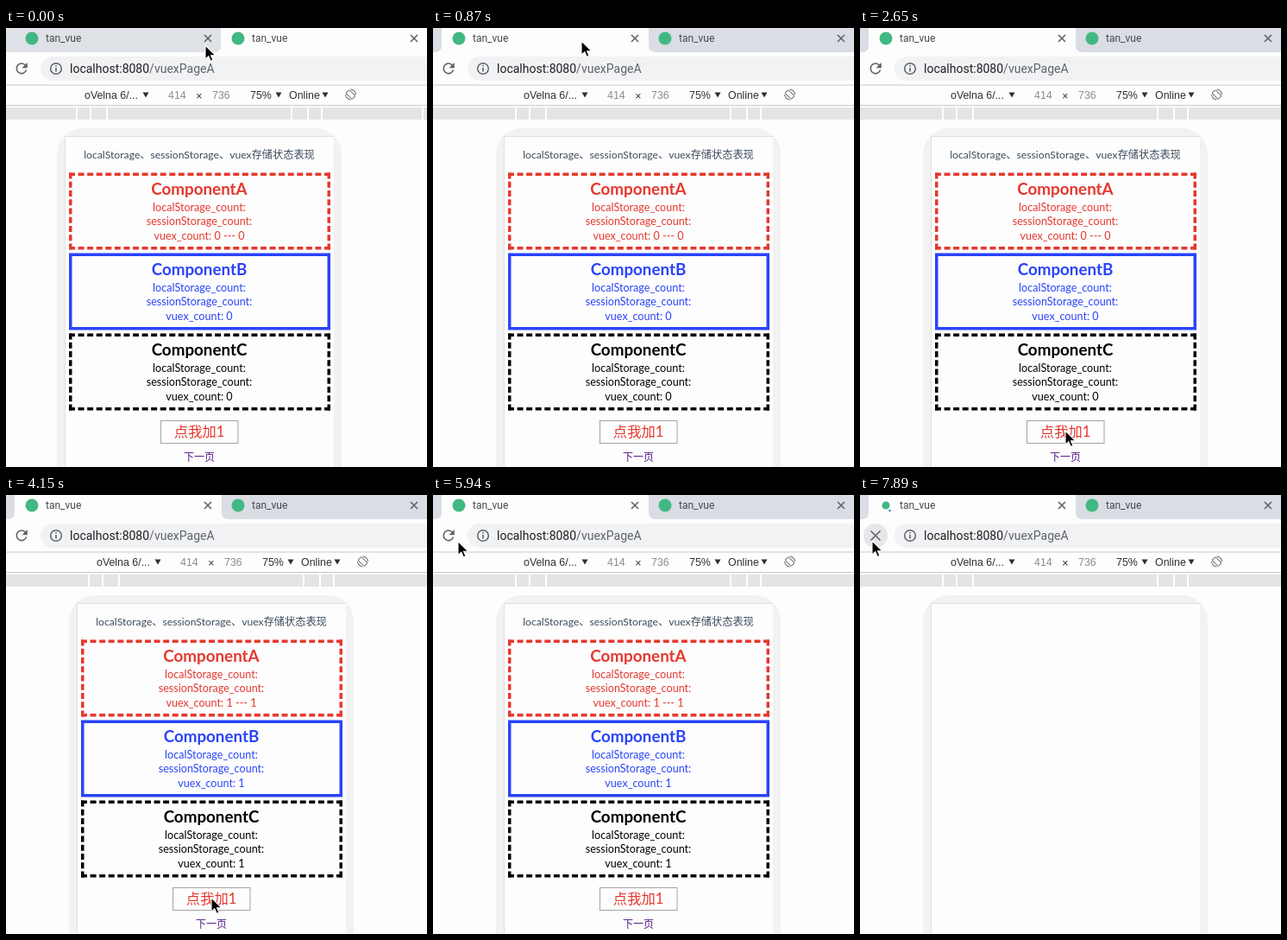
Animation, 488 px wide and 508 px high, one loop 8 s. Source, as an HTML page:

```html
<!DOCTYPE html>
<html lang="zh">
<head>
<meta charset="utf-8">
<style>
  html, body { margin: 0; width: 100%; height: 100%; overflow: hidden; background: #fdfdfd; }
  svg { display: block; width: 488px; height: 508px; }
  text { white-space: pre; }
  .ui { font: 12px Roboto, sans-serif; fill: #45494d; }
  .url { font: 14px Roboto, sans-serif; fill: #202124; }
  .tool { font: 12.4px "Liberation Sans", Arial, sans-serif; fill: #303030; }
  .page { font-family: Lato, "Noto Sans CJK SC", "Noto Sans CJK", sans-serif; text-anchor: middle; }
  .line { fill: none; stroke: #5f6368; stroke-width: 1.6; }
</style>
</head>
<body>
<svg viewBox="0 0 488 508">
  <rect width="488" height="508" fill="#fdfdfd"/>
  <rect width="488" height="30" fill="#dadde3"/>
  <rect id="hover" width="249" height="28" fill="#dee1e6"/>
  <path id="tab" fill="#fdfdfd"/>
  <rect y="28" width="488" height="37" fill="#fdfdfd"/>
  <g id="tabs"></g>
  <g id="spinner" fill="none" stroke-width="2">
    <circle cx="30" cy="12" r="6.6" stroke-dasharray="34 7.5"/>
  </g>
  <circle id="dot" cx="34.5" cy="18" r="1.3" fill="#3f82e8"/>

  <rect x="40" y="33" width="480" height="28" rx="14" fill="#f1f2f4"/>
  <g class="line">
    <circle cx="58" cy="47" r="6.3" stroke-width="1.5"/>
    <path d="M58 46v4.5M58 43v1.6"/>
  </g>
  <text class="url" x="74" y="52">localhost:8080<tspan fill="#5f6368">/vuexPageA</tspan></text>
  <circle id="press" cx="18" cy="47" r="14" fill="#e6e7e9"/>
  <g id="reload">
    <path class="line" stroke-width="1.9" d="M22.6 43.2A5.8 5.8 0 1 0 23.6 48.6"/>
    <path fill="#5f6368" d="M24.8 40v6.2h-6.2z"/>
  </g>
  <path id="stop" class="line" stroke-width="1.9" d="M12.5 41.5l11 11m0-11l-11 11"/>

  <path d="M0 66H488M0 89.5H488" stroke="#c9c9c9"/>
  <g id="view">
    <rect x="-20" y="92" width="540" height="14" fill="#e4e4e4"/>
    <path id="ticks" stroke="#fff" stroke-width="2"/>
    <g class="tool">
      <text x="105" y="81.5">oVelna 6/...</text>
      <text x="202" y="81.5" fill="#8c8c8c">414</text>
      <text x="234.3" y="83">×</text>
      <text x="253" y="81.5" fill="#8c8c8c">736</text>
      <text x="297" y="81.5">75%</text>
      <text x="342" y="81.5">Online</text>
      <path d="M172.5 74.5h7l-3.5 6zM326.5 74.5h7l-3.5 6zM380.5 74.5h7l-3.5 6z"/>
    </g>
    <g transform="translate(413.5 77) rotate(45)" fill="none" stroke="#6a6a6a">
      <rect x="-5" y="-2.7" width="10" height="5.4" rx="1"/>
      <path d="M-4.2 -4.2A6 6 0 0 1 4.2 -4.2M4.2 4.2A6 6 0 0 1 -4.2 4.2"/>
    </g>
    <rect x="73" y="116" width="330" height="440" rx="30" fill="#f2f2f3"/>
    <rect x="83" y="126" width="311" height="440" fill="#fdfdfd"/>
    <path d="M82.5 520V125.5H394" fill="none" stroke="#e0e0e1"/>
    <g id="content" class="page">
      <text x="238" y="151" font-size="12.2" fill="#3c4c5c">localStorage、sessionStorage、vuex存储状态表现</text>
      <g id="cards"></g>
      <rect x="193.5" y="454.5" width="89.5" height="26" fill="#fefefe" stroke="#a3a3a3"/>
      <text x="238" y="473" font-size="16.3" fill="#e5352c">点我加1</text>
      <text x="238" y="501" font-size="12" fill="#551a8b">下一页</text>
    </g>
  </g>
  <path id="cursor" d="M0 0V16.2L3.8 12.7L6.3 18.4L9 17.2L6.5 11.7H11.7Z"
        fill="#000" stroke="#fff" stroke-width="1.1" stroke-linejoin="round"/>
</svg>
<script>
const $ = id => document.getElementById(id);
const LOOP = 8000;

// tab titles, icons and close marks
$('tabs').innerHTML = [30, 269].map((x, i) => `
  <circle id="icon${i}" cx="${x}" cy="12" r="7.5" fill="#41b883"/>
  <text class="ui" x="${x + 16}" y="16">tan_vue</text>
  <path class="line" d="M${230 + 239 * i} 8l8 8m0-8l-8 8"/>`).join('');

$('ticks').setAttribute('d', [96, 112, 131, 345, 364, 380, 497].map(x => `M${x} 92v14`).join(''));

// card frame: outer box and line width
const LEFT = 87, WIDTH = 303, HEIGHT = 89, LINE = 3.5;

// each dashed side begins and ends with a full dash
function side(x, y, dx, dy) {
  const len = dx + dy, dash = 2 * LINE;
  const n = Math.round((len + LINE) / (dash + LINE)), gap = (len - dash * n) / (n - 1);
  return `<path d="M${x} ${y}l${dx} ${dy}" stroke-dasharray="${dash} ${gap}"/>`;
}

function border(y, dashed) {
  const h = LINE / 2, l = LEFT + h, t = y + h, w = WIDTH - LINE, v = HEIGHT - LINE;
  if (!dashed) return `<rect x="${l}" y="${t}" width="${w}" height="${v}"/>`;
  return side(LEFT, t, WIDTH, 0) + side(LEFT, t + v, WIDTH, 0) +
         side(l, y, 0, HEIGHT) + side(l + w, y, 0, HEIGHT);
}

function card(name, color, i) {
  const y = 167.5 + 93 * i;
  const row = (text, dy) => `<text x="238" y="${y + dy}" font-size="12.6">${text}</text>`;
  const n = '<tspan class="count">0</tspan>';
  return `<g fill="none" stroke="${color}" stroke-width="${LINE}">${border(y, i !== 1)}</g>
    <g fill="${color}">
      <text x="238" y="${y + 25.5}" font-size="18.8" font-weight="700">Component${name}</text>
      ${row('localStorage_count:', 44.7)}${row('sessionStorage_count:', 60.8)}
      ${row(`vuex_count: ${n}${i ? '' : ` --- ${n}`}`, 77.5)}
    </g>`;
}
$('cards').innerHTML = card('A', '#e5382f', 0) + card('B', '#2a44f9', 1) + card('C', '#000', 2);
const counts = document.querySelectorAll('.count');

// pointer positions, each held until the next: time, x, y
const path = [
  [0, 231, 20], [150, 212, 22], [290, 182, 3], [430, 165, 8], [580, 172, 15],
  [1470, 167, 40], [1620, 162, 88], [1770, 163, 132], [1910, 168, 168], [2060, 175, 194],
  [2210, 208, 300], [2350, 250, 420], [2500, 240, 461], [2650, 238, 466],
  [5350, 226, 430], [5500, 180, 310], [5640, 118, 180], [5790, 62, 92],
  [5940, 29, 53.5], [6090, 12, 50], [6390, 14, 53]
];

const show = (id, on) => $(id).setAttribute('display', on ? 'inline' : 'none');

function tabShape(l, r) {
  return `M${l - 8} 28q8 0 8 -8V-9H${r}V20q0 8 8 8z`;
}

function draw(t) {
  const [, x, y] = path.findLast(p => p[0] <= t);
  const switched = t >= 870, loading = t >= 6840, done = t >= 7890;
  $('cursor').setAttribute('transform', `translate(${x} ${y})`);
  $('tab').setAttribute('d', switched ? tabShape(10, 250) : tabShape(249, 500));
  $('view').setAttribute('transform', `translate(${switched ? 0 : -14} 0)`);
  show('hover', !switched);
  counts.forEach(c => c.textContent = t >= 4150 ? 1 : 0);

  show('press', t >= 6390);
  show('reload', !loading);
  show('stop', loading);
  show('icon0', !loading || done);
  $('icon0').setAttribute('r', done ? 4.5 : 7.5);
  show('spinner', loading && !done);
  show('dot', done);
  const step = Math.floor((t - 7290) / 150 + 0.02);
  $('spinner').setAttribute('stroke', t >= 7140 ? '#3f82e8' : '#9aa0a6');
  $('spinner').setAttribute('transform', `rotate(${-85 + step * 70} 30 12)`);
  show('content', t < 7590);
}

const start = performance.now();
function tick(now) {
  draw(Math.max(0, now - start) % LOOP);
  requestAnimationFrame(tick);
}
draw(0);
requestAnimationFrame(tick);
</script>
</body>
</html>
```
